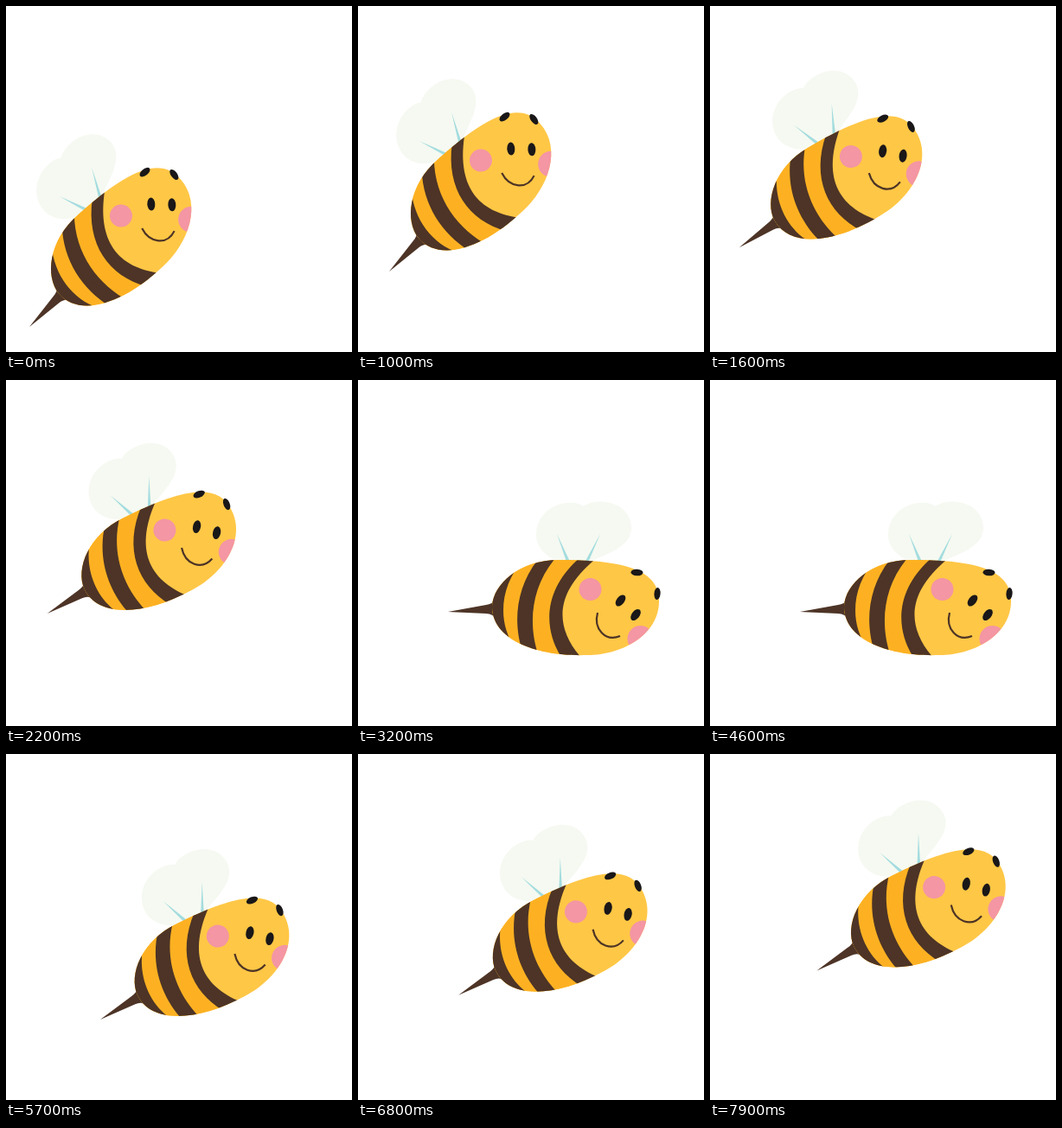
Animation of 400x400 px, one loop 8000 ms. Source, as an HTML page:

```html
<!DOCTYPE html>
<html>
<head>
<meta charset="utf-8">
<title>Bee</title>
<style>
html, body { margin: 0; width: 100%; height: 100%; overflow: hidden; background: #fff; }
svg { display: block; width: 100%; height: 100%; }
</style>
</head>
<body>
<svg viewBox="0 0 400 400">
  <clipPath id="hull">
    <path d="M155 262C156 236 187 208 232 208C304 208 349 218 348 256C348 294 306 318 265 318C208 320 155 301 155 262Z"/>
  </clipPath>
  <g id="bee">
    <g transform="translate(2 0)">
      <path fill="#f5f9f1" d="M242 212C220 210 204 196 204 178C205 154 226 141 245 142Q253 142 259 146C274 135 314 140 314 172C312 195 285 200 263 212Z"/>
      <path fill="#a3dcdf" d="M228 178L243 210H239ZM278 178L264 211H260Z"/>
    </g>
    <path fill="#4d3426" d="M104 268L148 260Q155 259 160 254V277Q156 270 148 270Z"/>
    <g clip-path="url(#hull)">
      <path fill="#ffc746" d="M150 200H350V325H150Z"/>
      <path fill="#fdb122" d="M150 200H266C220 240 220 285 247 322H150Z"/>
      <g fill="#4d3426">
        <path d="M150 205H194C164 235 160 280 182 310L150 322Z"/>
        <path d="M210 205C181 240 178 285 193 322H210C196 285 199 240 229 205Z"/>
        <path d="M257 205C216 240 212 285 236 322H259C226 285 227 245 277 205Z"/>
      </g>
      <g fill="#f496a3">
        <circle cx="268.5" cy="242" r="13"/>
        <circle cx="326.5" cy="299" r="15"/>
      </g>
    </g>
    <g fill="#1a1718">
      <ellipse rx="4.5" ry="7.5" transform="translate(303.5 255) rotate(38)"/>
      <ellipse rx="4.5" ry="7.5" transform="translate(321 271.5) rotate(38)"/>
      <ellipse rx="7" ry="3.8" transform="translate(322.5 222.5) rotate(3)"/>
      <ellipse rx="3.6" ry="7" transform="translate(346 247) rotate(5)"/>
    </g>
    <path fill="none" stroke="#4d3426" stroke-width="2.2" d="M277 269C272 288 286 303 303 296"/>
  </g>
</svg>
<script>
// time, sting tip x, sting tip y, upward tilt in degrees
const keys = [
  [0, 27, 371, 41.5], [1000, 36, 307, 41.5], [1800, 33, 270, 26.4], [2700, 66, 270, 26.4],
  [3200, 104, 268, 0], [3700, 86, 272, 17], [4600, 104, 268, 0], [5100, 112, 276, 0],
  [5700, 109, 307, 26.4], [8000, 124, 248, 26.4]
];
const bee = document.getElementById('bee');

function pose(t) {
  const i = keys.findIndex(k => k[0] > t);
  const a = keys[i - 1], b = keys[i];
  const f = (t - a[0]) / (b[0] - a[0]);
  return a.map((v, j) => v + (b[j] - v) * f);
}

function draw() {
  const t = Math.floor(performance.now() % 8000 / 100) * 100;
  const [, x, y, tilt] = pose(t);
  bee.setAttribute('transform', `translate(${x} ${y}) rotate(${-tilt}) translate(-104 -268)`);
  requestAnimationFrame(draw);
}
draw();
</script>
</body>
</html>
```
